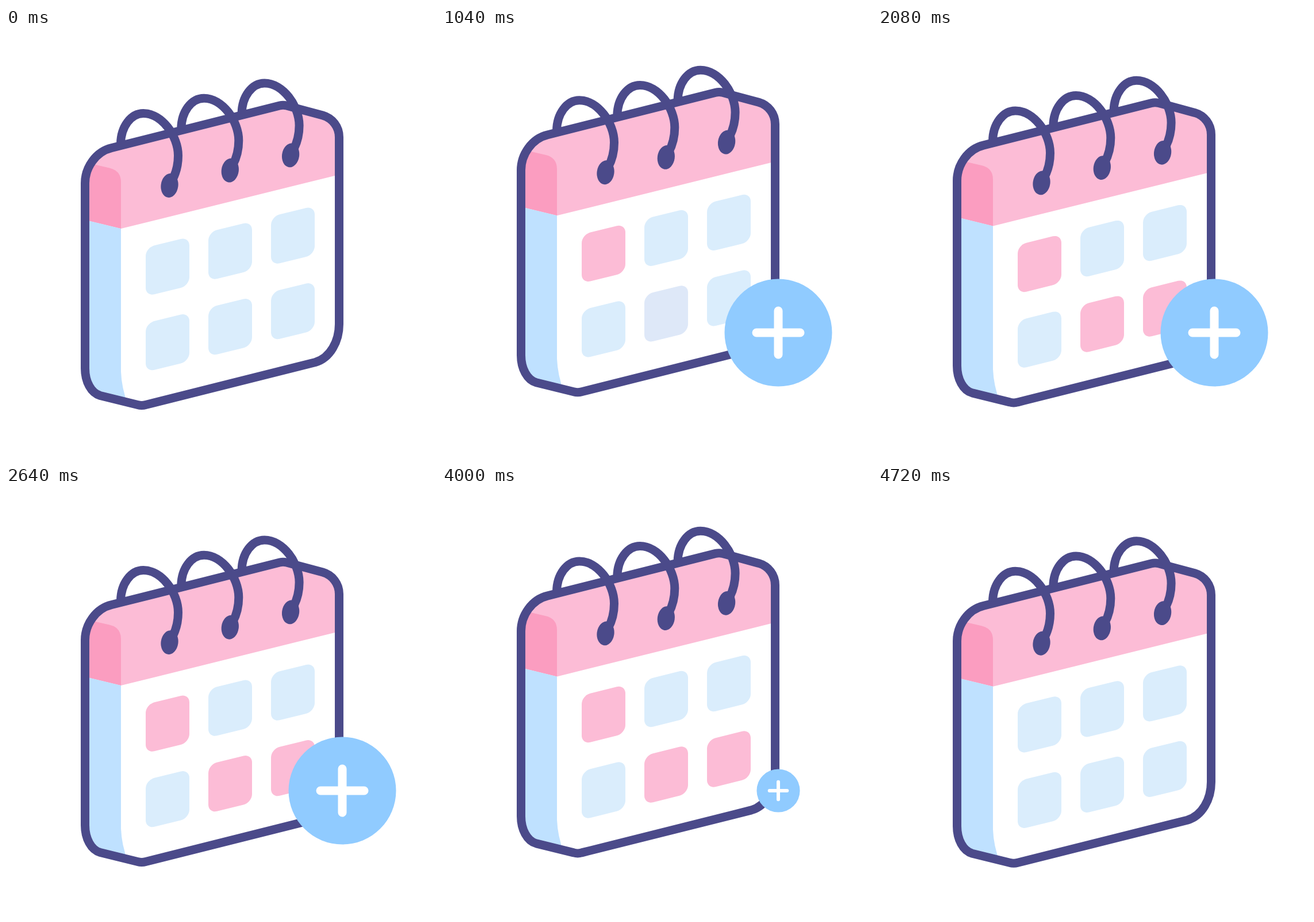
Write an HTML page that moves like this. It is 748 px wide and 748 px high and loops after 4.8 s.

```html
<!DOCTYPE html>
<html lang="en">
<head>
<meta charset="utf-8">
<title>Calendar</title>
<style>
html, body { margin: 0; width: 100%; height: 100%; overflow: hidden; background: #fff; }
svg { display: block; width: 100vw; height: 100vh; }
</style>
</head>
<body>
<svg viewBox="0 0 748 748">
  <defs>
    <path id="body" d="M137.5 270 C137.5 243 156 215 184 208.5 L476 135 Q482 133.5 488 135 L551 152 C568 157 579.5 172 579.5 190 V515 C579.5 545 564 574 538 581.5 L243 655.5 Q236 657.5 229 655.5 L164 639.5 C148 635 137.5 615 137.5 592 Z"/>
    <clipPath id="inside"><use href="#body"/></clipPath>
    <g id="ring">
      <path d="M199.5 201 C200 172 217 148.5 239 148.5 C271 148.5 299.5 188 299.5 222 C299.5 240 296 252 289 265" fill="none" stroke="#4b4a8a" stroke-width="15"/>
      <ellipse cx="284.5" cy="274" rx="15" ry="21" transform="rotate(8 284.5 274)" fill="#4b4a8a"/>
    </g>
  </defs>
  <g id="calendar">
    <g clip-path="url(#inside)">
      <rect x="130" y="120" width="460" height="545" fill="#fff"/>
      <path d="M130 120 H590 V252.5 L200 349 L130 332 Z" fill="#fcbcd6"/>
      <path d="M130 232 L180 243.5 Q200 248 200 268 V349 L130 332 Z" fill="#fb9dc0"/>
      <path d="M130 332 L200 349 V598 Q201 626 212 655 H130 Z" fill="#bfe1ff"/>
    </g>
    <g id="cells"></g>
    <use href="#body" fill="none" stroke="#4b4a8a" stroke-width="15" stroke-linejoin="round"/>
    <use href="#ring"/>
    <use href="#ring" x="105.3" y="-26.3"/>
    <use href="#ring" x="210.6" y="-52.6"/>
  </g>
  <g id="badge">
    <circle r="93.5" fill="#90cbff"/>
    <path d="M-38 0 H38 M0 -38 V38" stroke="#fff" stroke-width="15" stroke-linecap="round"/>
  </g>
</svg>
<script>
const LOOP = 4800;
const LIFT = 24;
const BLUE = [218, 237, 252];
const PINK = [252, 188, 214];
const FADE = 300;
const CLEAR_AT = 4160;
const TURNS = [0, 1220, 2430, 3580, LOOP];   // bob extremes: low, high, low, high, low
const MARKS = { 0: 580, 4: 1010, 5: 1440 };  // cell index: time it turns pink

const byId = id => document.getElementById(id);
const ramp = (t, from, to) => Math.min(1, Math.max(0, (t - from) / (to - from)));
const ease = p => (1 - Math.cos(Math.PI * p)) / 2;

const calendar = byId("calendar");
const badge = byId("badge");
const cells = [];

for (let i = 0; i < 6; i++) {
  const col = i % 3, row = Math.floor(i / 3);
  const cell = document.createElementNS("http://www.w3.org/2000/svg", "rect");
  const x = 243 + col * 109, y = 382 - col * 27 + row * 131.5;
  cell.setAttribute("transform", `matrix(1 -0.247 0 1 ${x} ${y})`);
  cell.setAttribute("width", 76);
  cell.setAttribute("height", 85);
  cell.setAttribute("rx", 15);
  byId("cells").append(cell);
  cells.push(cell);
}

function lift(t) {
  let i = 0;
  while (i < 3 && t >= TURNS[i + 1]) i++;
  const p = ease(ramp(t, TURNS[i], TURNS[i + 1]));
  return LIFT * (i % 2 ? 1 - p : p);
}

function tint(i, t) {
  if (!(i in MARKS)) return 0;
  return ramp(t, MARKS[i], MARKS[i] + FADE) - ramp(t, CLEAR_AT, CLEAR_AT + FADE);
}

function draw(t) {
  calendar.setAttribute("transform", `translate(0 ${-lift(t)})`);
  cells.forEach((cell, i) => {
    const k = tint(i, t);
    const rgb = BLUE.map((c, n) => Math.round(c + (PINK[n] - c) * k));
    cell.setAttribute("fill", `rgb(${rgb})`);
  });
  const size = ease(ramp(t, 407, 830)) - ease(ramp(t, 3804, 4154));
  badge.setAttribute("transform", `translate(585 530) scale(${size})`);
  badge.setAttribute("visibility", size > 0.001 ? "visible" : "hidden");
}

const start = performance.now();
function tick() {
  draw((performance.now() - start) % LOOP);
  requestAnimationFrame(tick);
}
draw(0);
requestAnimationFrame(tick);
</script>
</body>
</html>
```
